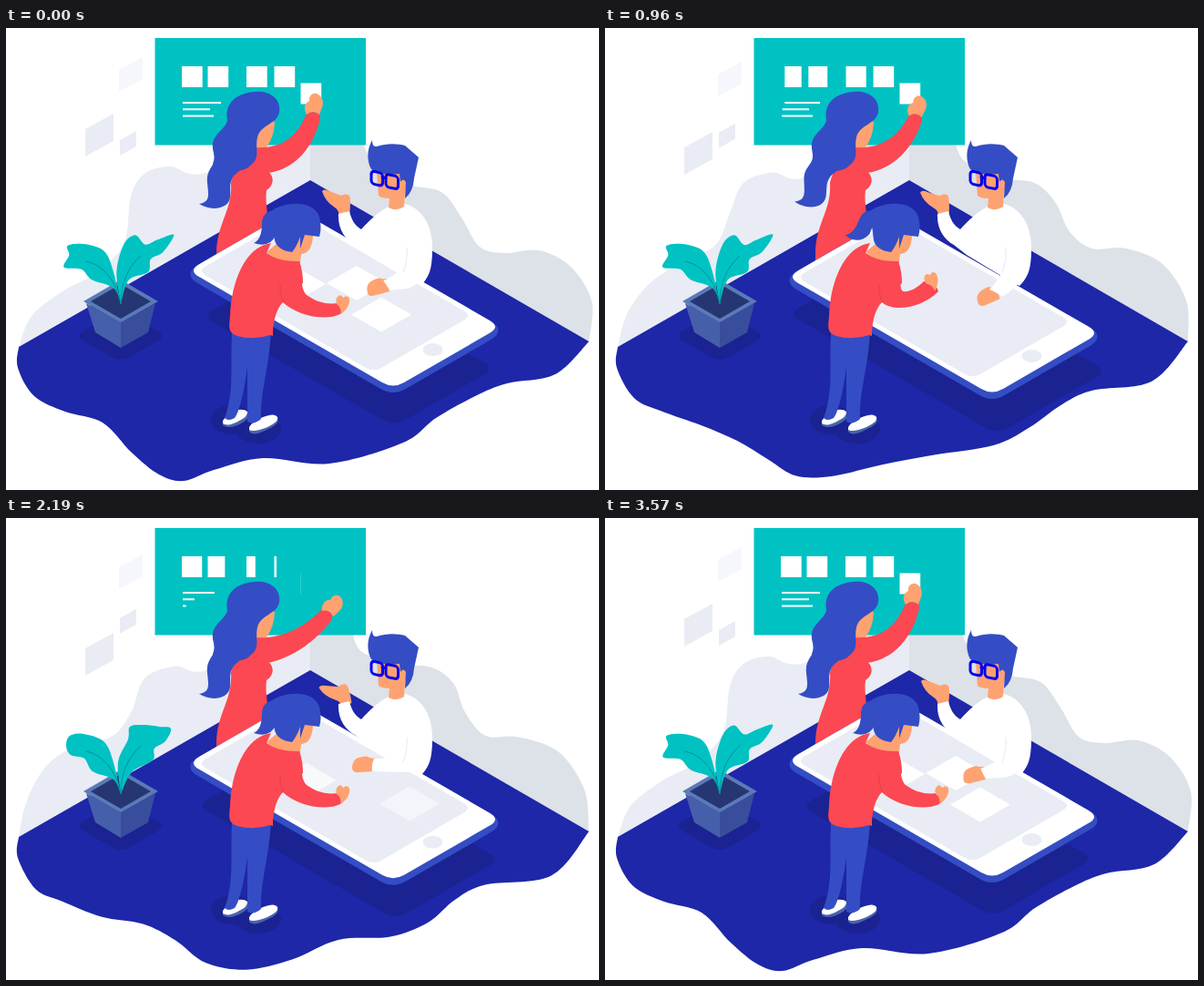
Recreate the animation shown at these times as an HTML page. Size 651 by 507 pixels, loop 3.6 s.

```html
<!DOCTYPE html>
<html lang="en">
<head>
<meta charset="utf-8">
<title>Team at work</title>
<style>
  html, body { margin: 0; width: 100%; height: 100%; overflow: hidden; background: #fff; }
  svg { display: block; width: 651px; height: 507px; }
  .blue { fill: #344dc4; }
  .red { fill: #fb4852; }
  .skin { fill: #ffa271; }
  .teal { fill: #00c2c3; }
  .white { fill: #fff; }
  .pale { fill: #e9ecf4; }
  .floor { fill: #1d27a8; }
  .shade { fill: #1a2391; }
  .line { fill: none; stroke-linecap: round; }
</style>
</head>
<body>
<!--
  data-iso:   centre x, y, half sides a, b and corner radius of a flat isometric plate
  data-curve: key points of a smooth outline; data-to: the same outline in its other pose
  data-by:    the motion that drives a part; data-move: dx, dy, angle and pivot of that motion
-->
<svg viewBox="0 0 651 507">
  <clipPath id="screen"><path data-iso="361 293 99 57 9"/></clipPath>

  <!-- room -->
  <path class="pale" data-by="drift" data-end="L334,167Z"
    data-curve="14,350 28,316 62,289 102,267 130,235 137,185 152,160 180,152 222,158 334,100"
    data-to="14,350 22,310 42,270 75,247 115,240 138,215 152,178 186,164 226,166 334,100"/>
  <path fill="#dde1e8" data-by="drift" data-end="L334,167Z"
    data-curve="334,100 380,108 402,145 440,171 478,180 500,208 520,240 548,247 585,244 620,262 643,300 640,344"
    data-to="334,100 372,112 388,146 430,159 466,162 490,178 502,210 524,238 560,240 605,256 634,298 640,344"/>
  <path class="floor" data-by="drift" data-end="L334,167Z"
    data-curve="14,350 13,373 31,404 65,421 106,433 138,466 168,490 195,497 228,485 282,472 355,478 436,455 472,428 515,404 550,390 603,380 640,344"
    data-to="14,350 13,373 33,408 62,421 104,438 152,443 188,460 222,487 268,497 318,486 366,461 420,460 462,446 490,421 523,404 598,394 640,344"/>

  <!-- floating cards -->
  <path fill="#f6f7fd" data-by="drift" data-move="0 9" d="M124,46l26,-14v24l-26,14Z"/>
  <path class="pale" data-by="drift" data-move="0 36" d="M87,111l31,-17v30l-31,17Z"/>
  <path class="pale" data-by="drift" data-move="0 -15" d="M125,123l18,-10v17l-18,10Z"/>

  <path class="teal" d="M163.500,11H395V128.500H163.500Z"/>
  <g id="board" class="white"></g>

  <!-- plant -->
  <path class="shade" data-iso="126 338 25 25 10"/>
  <path fill="#5b7ab8" data-iso="126 300 20.500 20.500 0"/>
  <path fill="#263673" data-iso="126 300 16.500 16.500 0"/>
  <path fill="#465fab" d="M88,302L126,323V351L98,334Z"/>
  <path fill="#384e9c" d="M164,302L126,323V351L156,334Z"/>
  <path class="teal" data-by="leaf"
    data-curve="126,303 117,264 107,244 85,237 67,239 70,249 62,263 82,265 94,276 118,285 126,303"
    data-to="126,303 117,265 107,245 85,237 70,239 66,250 71,260 86,264 95,278 118,287 126,303"/>
  <path class="teal" data-by="leaf"
    data-curve="126,303 121,268 128,237 143,227 153,240 166,233 185,226 172,246 158,254 155,268 134,276 126,303"
    data-to="126,303 123,268 134,243 136,229 152,227 168,229 181,231 175,245 163,253 161,266 138,279 126,303"/>
  <path class="line" stroke="#00929c" d="M88,256C108,260 122,280 126,303C126,280 134,262 148,250"/>

  <!-- woman at the board -->
  <path class="red" d="M276,131C262,135 250,155 247,170C249,200 231,215 231,248V262H292L286,195Q285,185 286,178C294,173 295,163 288,158L290,140Z"/>
  <path class="skin" d="M272,108L290,96L295,104Q294,120 286,131Q280,134 274,132Z"/>
  <path class="red" data-by="arm"
    d="M272,131C300,133 318,122 329,96Q333,89 344,94Q346,97 344,103C337,130 318,155 288,159Z"
    data-to="M272,131C303,134 330,118 347,100Q351,96 358,106Q359,109 356,114C340,134 318,152 288,159Z"/>
  <path class="skin" data-by="arm" data-move="16 10 27 337 95"
    d="M330,95C326,88 328,82 333,80C332,74 337,71 341,72C348,75 349,82 347,87L344,95Q337,89 330,95Z"/>
  <path class="blue" data-by="tail" data-move="0 0 12 250 130"
    d="M228,137L264,150C256,158 250,160 248,166C243,176 251,188 240,195C231,200 220,198 212,193C225,191 222,182 221,170C219,152 232,153 228,137Z"/>
  <path class="blue" d="M272,70C290,68 302,78 300,92C298,106 280,105 276,120C273,134 280,142 268,151C262,158 252,156 246,158L227,149Q230,143 228,137C222,117 241,113 243,101C240,85 250,72 272,70Z"/>

  <!-- phone -->
  <path id="shadow" class="shade" data-iso="0 0 112.500 59 12"/>
  <g data-by="bob" data-move="0 7">
    <path class="blue" stroke="#344dc4" stroke-width="7" data-iso="371.500 301 112.500 59 12"/>
    <path class="white" data-iso="371.500 297 112.500 59 12"/>
    <path class="pale" data-iso="361 291 96.500 54 9"/>
    <ellipse class="pale" cx="468.500" cy="353" rx="11" ry="7"/>
  </g>
  <g id="tiles" class="white" clip-path="url(#screen)"></g>

  <!-- man -->
  <path class="skin" data-by="arm" data-move="0 0 -16 371 195"
    d="M347,179Q349,176 355,179L368,184Q373,181 377,184Q379,189 377,205L365,206Q366,200 361,197Q350,190 347,179Z"/>
  <path class="white" d="M420,196C408,202 398,212 390,221C383,217 379,210 377,201L365,204C364,220 372,232 383,238L397,249L440,275L455,283C466,272 468,262 468,240C468,215 455,197 438,193Z"/>
  <path class="skin" data-by="drag" data-move="27 20 -20 403 271"
    d="M380,275Q380,265 387,263Q397,260 399,263L406,264L404,278L388,279Q381,280 380,275Z"/>
  <path class="white" data-by="drag"
    d="M441,235C443,255 425,266 404,264Q401,270 402,278L440,279C460,278 468,262 468,240Z"
    data-to="M440,243C442,262 434,274 422,287Q428,289 436,295L442,291C460,278 468,262 468,240Z"/>
  <path class="line" stroke="#e6e9f1" d="M440,241Q441,256 436,268"/>
  <path class="skin" d="M407,158L433,160L440,167Q440,174 438,180L437,196Q429,202 420,197L421,187Q412,187 409,184Z"/>
  <path class="blue" d="M402,123Q402,131 407,130C419,126 430,127 438,129L453,142L448,165Q447,180 438,187L439,169Q436,164 433,169L432,160Q414,163 401,155C396,146 396,133 402,123Z"/>
  <g class="line" stroke="#0000ec" stroke-width="3" transform="skewY(12)">
    <rect x="401" y="71.500" width="12.500" height="14" rx="3.500"/>
    <rect x="417" y="71.500" width="13.500" height="14" rx="3.500"/>
    <path d="M413,76H417"/>
  </g>

  <!-- woman in front -->
  <g class="shade">
    <ellipse cx="248" cy="430" rx="23" ry="16"/>
    <ellipse cx="277" cy="440" rx="25" ry="16"/>
  </g>
  <path fill="#4a63ac" d="M238,432L265,424Q268,429 258,434Q245,441 238,436ZM267,439L298,429Q301,434 288,440Q272,449 267,443Z"/>
  <path class="white" d="M238,431Q241,426 250,420Q261,417 265,421Q266,426 256,431Q244,438 238,434ZM267,438Q270,432 282,427Q295,422 298,427Q300,432 287,438Q272,444 267,441Z"/>
  <path class="blue" d="M248,334L291,333C289,372 279,400 280,429Q272,436 265,432V372C262,395 257,420 251,428Q244,432 240,428C251,399 246,370 248,334Z"/>
  <path class="skin" d="M322,225L337,228Q336,247 324,248L323,257Q300,260 286,246L298,236Z"/>
  <path class="red" d="M291,236C262,240 247,280 246,316C245,327 243,335 254,338Q272,343 290,337L293,338V333C294,320 297,308 304,301L326,280Q326,267 322,256Q300,257 286,247Z"/>
  <path class="red" data-by="reach"
    d="M304,301C320,316 350,322 367,314Q370,310 364,302C350,304 338,299 330,293C322,285 326,267 322,256L300,275Z"
    data-to="M304,301C318,313 350,306 366,289Q364,280 350,278C343,285 335,290 327,289C322,285 326,267 322,256L300,275Z"/>
  <path class="line" stroke="#e53f4c" d="M301,282Q300,293 305,301"/>
  <path class="skin" data-by="reach" data-move="-8 -24 -25 366 308"
    d="M363,303Q361,297 365,294Q368,292 370,296Q375,292 377,297Q378,303 373,309L368,314Q368,306 363,303Z"/>
  <path class="blue" data-by="pony" data-move="0 0 20 293 207"
    d="M298,199Q281,201 281,214Q281,232 272,236Q290,242 297,226Z"/>
  <path class="blue" d="M291,201C305,190 337,188 344,207Q347,219 344,229L328,227L323,242V229Q319,240 314,246Q298,244 295,233Z"/>
</svg>

<script>
const LOOP = 3600, SLOPE = .577;
const $ = id => document.getElementById(id);
const numbers = /-?\d+(\.\d+)?/g;

const progress = (t, start, length) => Math.min(1, Math.max(0, (t - start) / length));
const ease = (t, start, length) => {
  const p = progress(t, start, length);
  return p < .5 ? 4 * p ** 3 : 1 - 4 * (1 - p) ** 3;
};
const wave = (t, period) => (1 - Math.cos(2 * Math.PI * t / period)) / 2;

// Rounded plate lying flat, with sides along the two isometric axes
function plate(x, y, a, b, r) {
  const at = (u, v) => `${x + u + v},${y + (u - v) * SLOPE} `;
  const corner = (u, v, startU, startV) => {
    const inU = u - Math.sign(u) * r, inV = v - Math.sign(v) * r;
    return at(startU ? inU : u, startV ? inV : v) + 'Q' + at(u, v) + at(startU ? u : inU, startV ? v : inV);
  };
  return 'M' + [corner(-a, -b, 0, 1), corner(a, -b, 1, 0), corner(a, b, 0, 1), corner(-a, b, 1, 0)].join('L') + 'Z';
}

// Smooth path through a list of points
function curve(text, end) {
  const pts = text.split(' ').map(p => p.split(',').map(Number));
  const at = i => pts[Math.max(0, Math.min(pts.length - 1, i))];
  const near = (i, side) => at(i).map((v, k) => (v + side * (at(i + 1)[k] - at(i - 1)[k]) / 6).toFixed(2));
  return 'M' + pts[0] + pts.slice(1).map((p, i) => `C${near(i, 1)} ${near(i + 1, -1)} ${p}`).join('') + end;
}

function add(parent, tag, attributes) {
  const node = document.createElementNS('http://www.w3.org/2000/svg', tag);
  for (const key in attributes) node.setAttribute(key, attributes[key]);
  return $(parent).appendChild(node);
}

for (const node of document.querySelectorAll('[data-iso]'))
  node.setAttribute('d', plate(...node.dataset.iso.split(' ').map(Number)));

const movers = [...document.querySelectorAll('[data-move]')].map(node =>
  ({ node, by: node.dataset.by, move: node.dataset.move.split(' ').map(Number) }));

const morphs = [...document.querySelectorAll('[data-to]')].map(node => {
  const { by, to, curve: points, end = 'Z' } = node.dataset;
  return {
    node, by,
    from: points ? curve(points, end) : node.getAttribute('d'),
    to: (points ? curve(to, end) : to).match(numbers)
  };
});

// Squares and text lines are wiped one after the other
const items = [];
function addItem(order, x, y, width, height) {
  items.push({ order, x, width, node: add('board', 'rect', { x, y, width, height }) });
}
[193, 221.5, 264, 294.5, 323.5].forEach((x, i) => addItem(i, x, i < 4 ? 42 : 60.5, 22.7, 23));
[42, 30, 34].forEach((width, i) => addItem(i + 1, 194, 81 + 7.25 * i, width, 2));

const tiles = [[318, 281], [385, 280], [412, 314.5]].map(([x, y]) =>
  ({ x, y, node: add('tiles', 'path', { d: plate(0, 0, 16.5, 16.5, 0) }) }));

function draw(t) {
  const poses = {
    drift: wave(t, LOOP),
    bob: wave(t, LOOP / 2),
    leaf: wave(t - 500, LOOP),
    arm: ease(t, 750, 550) - ease(t, 2400, 450),
    tail: ease(t, 750, 500) - ease(t, 1450, 750),
    reach: ease(t, 100, 500) - ease(t, 1550, 550),
    pony: ease(t, 250, 400) - ease(t, 850, 900),
    drag: ease(t, -420, 800) - ease(t, 1620, 500) + ease(t, 3180, 800)
  };

  for (const { node, by, from, to } of morphs) {
    let i = 0;
    node.setAttribute('d', from.replace(numbers, n => (+n + (to[i++] - n) * poses[by]).toFixed(2)));
  }
  for (const { node, by, move: [dx, dy, angle = 0, x = 0, y = 0] } of movers) {
    const p = poses[by];
    node.setAttribute('transform', `translate(${dx * p} ${dy * p}) rotate(${angle * p} ${x} ${y})`);
  }
  $('shadow').setAttribute('transform', `translate(376 345) scale(${.933 + .087 * poses.bob})`);

  const leaving = t < 1600;
  for (const { order, x, width, node } of items) {
    const gone = ease(t, 780 + 45 * order, 500);
    node.setAttribute('x', leaving ? x + width * gone : x);
    node.setAttribute('width', width * (leaving ? 1 - gone : ease(t, 1720 + 100 * order, 570)));
  }
  tiles.forEach(({ x, y, node }, i) => {
    const start = leaving ? 20 + 110 * (i % 2) : 1720 + 150 * i;
    const length = leaving ? 550 : 680;
    const p = progress(t, start, length), eased = ease(t, start, length);
    const slide = leaving ? -65 * eased : 100 * (1 - eased);
    node.setAttribute('transform', `translate(${x + slide} ${y + slide * SLOPE})`);
    node.setAttribute('opacity', leaving ? 1 - p * p : p);
  });
}

const begin = performance.now();
function tick() {
  draw((performance.now() - begin) % LOOP);
  requestAnimationFrame(tick);
}
tick();
</script>
</body>
</html>
```
